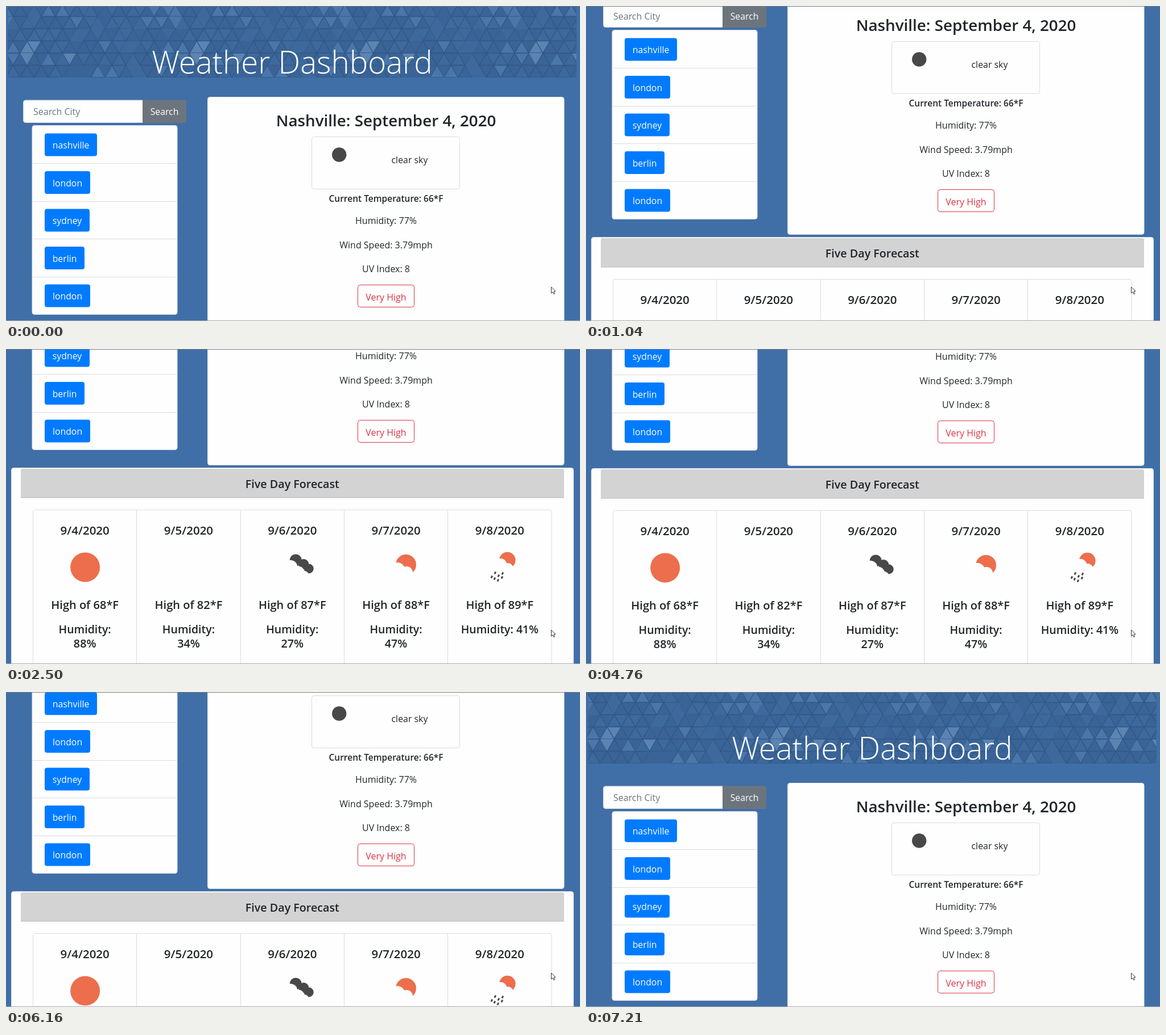
Recreate the animation shown at these times as an HTML page with a canvas. Size 1009 px wide and 555 px high, loop 8000 ms.

```html
<!DOCTYPE html>
<html lang="en">
<head>
<meta charset="utf-8">
<title>Weather Dashboard</title>
<style>
  html, body { margin: 0; width: 100%; height: 100%; overflow: hidden; background: #406fa7; }
  canvas { display: block; }
</style>
</head>
<body>
<canvas id="stage" width="1009" height="555"></canvas>
<script>
const W = 1009, H = 555, LOOP = 8000;
const ctx = document.getElementById('stage').getContext('2d');
const FONT = '"Open Sans", "Noto Sans", sans-serif';
const BLUE = '#406fa7', WHITE = '#fefefe', INK = '#212529', LINE = '#dcdcdc';
const SUN = '#ec6e4c', DARK = '#484848', RED = '#dc3545';

// Wheel scrolling: start time of each step and its scroll offset.
const SCROLL = [
  [0, 0], [500, 3], [640, 32], [790, 73], [920, 120], [1040, 168], [1180, 226], [1320, 261],
  [1720, 262], [1850, 274], [1970, 295], [2120, 320], [2240, 341], [2380, 357], [2500, 366],
  [4760, 365], [4880, 353], [5030, 326], [5160, 296], [5280, 273], [5420, 260],
  [5860, 259], [6020, 247], [6160, 224], [6280, 194], [6400, 160], [6520, 123],
  [6670, 82], [6810, 48], [6930, 23], [7060, 8], [7210, 0]
];

const CITIES = [['nashville', 92], ['london', 80], ['sydney', 79], ['berlin', 70], ['london', 80]];
const DAYS = [
  ['9/4/2020', 68, 88, sunny], ['9/5/2020', 82, 34, null], ['9/6/2020', 87, 27, cloudy],
  ['9/7/2020', 88, 47, partlySunny], ['9/8/2020', 89, 41, showers]
];

function scrollAt(t) {
  let y = 0;
  for (const [start, offset] of SCROLL) if (t >= start) y = offset;
  return y;
}

function rect(x, y, w, h, color) {
  ctx.fillStyle = color;
  ctx.fillRect(x, y, w, h);
}

function box(x, y, w, h, fill, stroke, radius = 4) {
  ctx.beginPath();
  ctx.roundRect(x, y, w, h, radius);
  if (fill) { ctx.fillStyle = fill; ctx.fill(); }
  if (stroke) { ctx.strokeStyle = stroke; ctx.lineWidth = 1; ctx.stroke(); }
}

function text(str, x, y, size, { weight = 400, color = INK, align = 'center' } = {}) {
  ctx.font = `${weight} ${size}px ${FONT}`;
  ctx.fillStyle = color;
  ctx.textAlign = align;
  ctx.fillText(str, x, y);
}

function disc(x, y, r, color) {
  ctx.beginPath();
  ctx.arc(x, y, r, 0, Math.PI * 2);
  ctx.fillStyle = color;
  ctx.fill();
}

function sunny(x, y) { disc(x + .5, y, 26, SUN); }

function cloudy(x, y) {
  disc(x + 6, y - 12.5, 10.5, DARK);
  disc(x + 20, y - 5.5, 9, DARK);
  disc(x + 29, y + 2.5, 8.5, DARK);
  disc(x - 3, y - .5, 12, WHITE);
  disc(x + 12, y + 6.5, 8, WHITE);
  disc(x + 21, y + 14.5, 8, WHITE);
}

function partlySunny(x, y) {
  disc(x + 17.5, y - 4.5, 18, SUN);
  disc(x + 2.5, y + 4.5, 13, WHITE);
  disc(x + 18.5, y + 9.5, 11, WHITE);
}

function showers(x, y) {
  disc(x + 13.5, y - 12.5, 14.3, SUN);
  disc(x + 1.5, y - 4.5, 11, WHITE);
  disc(x + 14.5, y + 1.5, 9, WHITE);
  ctx.strokeStyle = DARK;
  ctx.lineWidth = 2.8;
  for (const [dx, dy] of [[-14, 17], [-8, 10], [-9, 20], [-2, 15], [-3, 23], [5, 11], [4, 18]]) {
    ctx.beginPath();
    ctx.moveTo(x + dx + 1, y + dy - 2);
    ctx.lineTo(x + dx - 1, y + dy + 2);
    ctx.stroke();
  }
}

function noise(a, b) {
  const n = Math.sin(a * 127.1 + b * 311.7 + 4.3) * 43758.5453;
  return n - Math.floor(n);
}

function triangle(x, y, half, h, up) {
  ctx.beginPath();
  ctx.moveTo(x - half, up ? y + h : y);
  ctx.lineTo(x + half, up ? y + h : y);
  ctx.lineTo(x, up ? y : y + h);
  ctx.closePath();
}

// Triangular mosaic that repeats every 24 half-cells.
function banner() {
  const half = 12.42, h = 21.5, period = 24;
  ctx.save();
  ctx.beginPath();
  ctx.rect(3.5, 0, 999, 126);
  ctx.clip();
  rect(3, 0, 1000, 126, '#3a6497');
  for (let row = 0; row < 6; row++) {
    for (let k = -1; k < 83; k++) {
      const col = (k + period) % period, n = noise(col, row), up = (row + k) % 2 === 0;
      const x = k * half, y = row * h - 3;
      const lively = col < 9 || col > 19;
      const bright = (row === 3 && (col === 3 || col === 4)) || (row === 4 && (col === 3 || col === 9));
      triangle(x, y, half, h, up);
      if (bright) ctx.fillStyle = '#5b84b3';
      else if (n > (lively ? .78 : .95)) ctx.fillStyle = '#4a76aa';
      else if (n > .5) ctx.fillStyle = '#3d699d';
      else ctx.fillStyle = '#3a6497';
      ctx.fill();
      if (noise(row + 40, col) > .3) {
        ctx.strokeStyle = '#315987';
        ctx.lineWidth = 1.4;
        ctx.stroke();
      }
    }
  }
  ctx.restore();
  text('Weather Dashboard', 503, 118.5, 54.6, { weight: 300, color: '#fff' });
}

function searchPanel() {
  box(30.5, 166, 210, 39.5, WHITE, '#ced4da', [4, 0, 0, 4]);
  text('Search City', 48, 192, 16, { color: '#6c757d', align: 'left' });
  box(240, 165.5, 77, 40.5, '#6c757d', null, [0, 4, 4, 0]);
  text('Search', 278.5, 192, 15.8, { color: '#fff' });

  box(46, 210.5, 255, 333, WHITE, '#dfe3e8');
  CITIES.forEach(([name, w], i) => {
    const y = 224.5 + i * 66.5;
    if (i) rect(47, Math.round(y - 14), 253, 1, LINE);
    box(68, y, w, 40, '#007bff');
    text(name, 68 + w / 2, y + 26.5, 15.8, { color: '#fff' });
  });
}

function currentPanel() {
  const mid = 668;
  box(354.5, 160.5, 626.5, 410, WHITE, '#dfe3e8');
  text('Nashville: September 4, 2020', mid, 211.5, 27.8, { weight: 600 });
  box(537.5, 230.5, 260, 92, null, LINE);
  disc(585.7, 262, 12.7, DARK);
  text('clear sky', 709.5, 277, 15.9);
  text('Current Temperature: 66*F', mid, 345, 15.5, { weight: 600 });
  text('Humidity: 77%', mid, 384, 16);
  text('Wind Speed: 3.79mph', mid, 426.5, 16);
  text('UV Index: 8', mid, 468.5, 16);
  box(618.5, 491.5, 99, 39, null, RED);
  text('Very High', mid, 518.5, 16, { color: RED });
}

function forecastPanel() {
  const left = 47.5, cell = 182.3, bold = { weight: 600 };
  box(9.5, 575.5, 988, 420, WHITE, '#dfe3e8');
  box(26, 577, 955, 51, '#d3d3d3', null, [3, 3, 0, 0]);
  rect(26, 627.5, 955, 1, '#b9b9b9');
  text('Five Day Forecast', 503.3, 610.5, 19.7, bold);

  box(left, 649.5, cell * 5, 330, null, LINE);
  DAYS.forEach(([date, high, humidity, icon], i) => {
    const x = left + cell * (i + .5);
    if (i) rect(Math.round(left + cell * i - .5), 650, 1, 330, LINE);
    text(date, x, 693, 20.5, bold);
    if (icon) icon(x, 750.5);
    text(`High of ${high}*F`, x, 824, 20, bold);
    if (i === 4) {
      text(`Humidity: ${humidity}%`, x, 866.5, 19.5, bold);
    } else {
      text('Humidity:', x, 866.5, 19.5, bold);
      text(`${humidity}%`, x, 891.5, 19.8, bold);
    }
  });
}

function pointer() {
  ctx.beginPath();
  [[958.5, 495], [958.5, 506], [961, 503.8], [962.8, 507.6], [964.6, 506.8], [962.9, 503], [966, 502.6]]
    .forEach(([x, y]) => ctx.lineTo(x, y));
  ctx.closePath();
  ctx.fillStyle = '#fff';
  ctx.fill();
  ctx.strokeStyle = '#333';
  ctx.lineWidth = 1;
  ctx.stroke();
}

function draw(t) {
  rect(0, 0, W, H, BLUE);
  ctx.save();
  ctx.translate(0, -scrollAt(t));
  banner();
  searchPanel();
  currentPanel();
  forecastPanel();
  ctx.restore();
  rect(0, 0, W, 1, '#767a80');
  rect(0, 554, W, 1, '#a3a6aa');
  pointer();
}

function frame() {
  draw(performance.now() % LOOP);
  requestAnimationFrame(frame);
}
frame();
</script>
</body>
</html>
```
